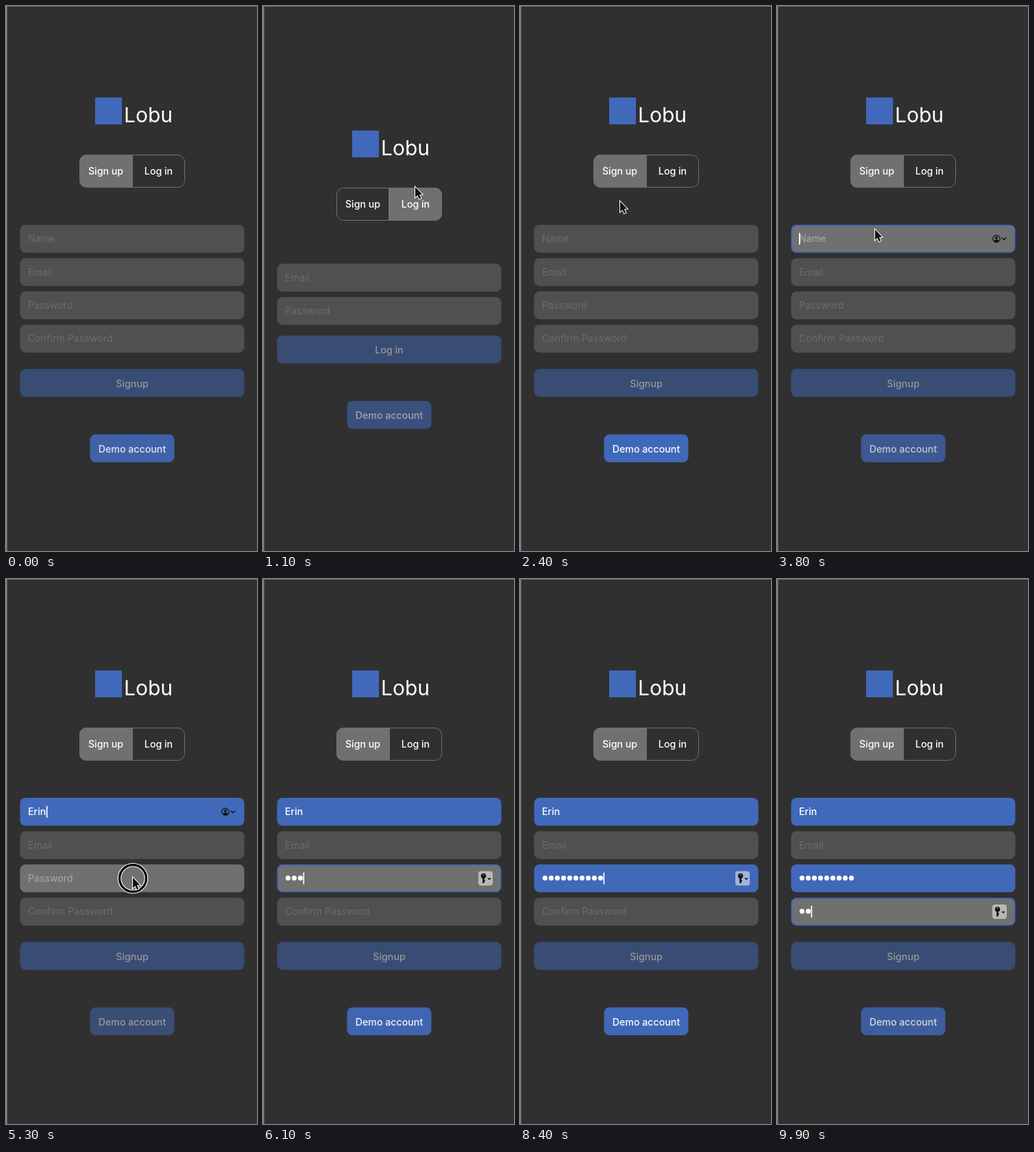
Animation of 366x792 px, one loop 10 s. Source, as an HTML page with a canvas:

```html
<!DOCTYPE html>
<html lang="en">
<head>
<meta charset="utf-8">
<title>Sign up</title>
<style>
  html, body { margin: 0; width: 100%; height: 100%; overflow: hidden; background: #313031; }
  canvas { display: block; }
</style>
</head>
<body>
<canvas width="366" height="792"></canvas>
<script>
const c = document.querySelector('canvas').getContext('2d');
const BG = '#313031', GRAY = '#717071', BLUE = '#4169b9', HINT = '#a9a9a9';
const LEFT = 20.5, WIDTH = 327, HEIGHT = 40.5;

// Pointer path: seconds, x, y
const path = [
  [0.1, 262, 330], [0.8, 222, 241], [1.4, 222, 285], [1.7, 169, 283], [1.95, 146, 284],
  [2.5, 146, 284], [3.3, 143, 325], [4.1, 143, 325], [4.9, 150, 345], [5.2, 185, 434], [10, 185, 434]
];
const clicks = [0.95, 2.05, 3.4, 5.25];

const within = (t, a, b) => t >= a && t < b;
const count = (t, start, step, max) => Math.max(0, Math.min(max, Math.floor((t - start) / step)));

function round(x, y, w, h, r, fill) {
  c.beginPath();
  c.roundRect(x, y, w, h, r);
  c.fillStyle = fill;
  c.fill();
}

function text(s, x, y, fill = '#fff', align = 'left', font = '500 14.2px') {
  c.font = font + ' Inter, sans-serif';
  c.textAlign = align;
  c.fillStyle = fill;
  c.fillText(s, x, y);
}

function stroke(points, color, width) {
  c.beginPath();
  points.forEach(([x, y]) => c.lineTo(x, y));
  c.strokeStyle = color;
  c.lineWidth = width;
  c.stroke();
}

function circle(x, y, r, fill) {
  c.beginPath();
  c.arc(x, y, r, 0, 7);
  if (fill) {
    c.fillStyle = fill;
    c.fill();
  }
}

// Fades a finished control into the background
function fade(x, y, w, h, opacity) {
  c.globalAlpha = 1 - opacity;
  round(x - 0.5, y - 0.5, w + 1, h + 1, 8, BG);
  c.globalAlpha = 1;
}

function button(label, x, y, w, opacity) {
  round(x, y, w, HEIGHT, 8, BLUE);
  text(label, x + w / 2, y + 26, '#fff', 'center');
  fade(x, y, w, HEIGHT, opacity);
}

function chevron(x, y, s) {
  stroke([[x - s, y - s / 2], [x, y + s / 2], [x + s, y - s / 2]], '#111', 1.4);
}

function personIcon(y) {
  circle(320, y, 5.2);
  c.strokeStyle = '#111';
  c.lineWidth = 1.2;
  c.stroke();
  circle(320, y - 1.3, 1.9, '#111');
  c.beginPath();
  c.ellipse(320, y + 3.2, 3.5, 2, 0, 0, 7);
  c.fill();
  chevron(331, y, 3);
}

function keyIcon(y) {
  round(314, y - 10.5, 21, 21, 4, 'rgba(255,255,255,.5)');
  circle(321.5, y - 3.5, 3.7, '#111');
  c.fillRect(320.2, y, 2.6, 7);
  c.fillRect(322, y + 2.5, 2, 1.5);
  circle(321.5, y - 5, 0.9, '#aaa');
  chevron(330, y + 0.5, 2);
}

function field({ hint, value = '', dots = 0, valid, focus, icon }, y, pointer) {
  const mid = y + HEIGHT / 2;
  const hover = pointer && within(pointer[0], LEFT, LEFT + WIDTH) && within(pointer[1], y, y + HEIGHT);
  round(LEFT, y, WIDTH, HEIGHT, 8, focus || valid ? BLUE : GRAY);
  if (focus && !valid) round(LEFT + 1.7, y + 1.7, WIDTH - 3.4, HEIGHT - 3.4, 6.5, GRAY);
  if (value) text(value, 32, mid + 5);
  else if (!dots) text(hint, 32, mid + 5, HINT, 'left', '400 14.2px');
  for (let i = 0; i < dots; i++) circle(36.5 + 9 * i, mid - 0.5, 3.6, '#fff');
  if (focus) {
    const end = dots ? 31 + 9 * dots + 0.5 : value ? 32.5 + c.measureText(value).width : 32;
    c.fillStyle = '#fff';
    c.fillRect(end, mid - 8.5, 1.7, 17);
    icon(mid);
  }
  if (!focus && !valid && !hover) fade(LEFT, y, WIDTH, HEIGHT, 0.5);
}

function header(y, login) {
  round(130, y, 39, 39, 0, BLUE);
  text('Lobu', 172, y + 36, '#fff', 'left', '400 30px');
  const top = y + 83;
  round(login ? 183 : 107, top, 78, 48, login ? [0, 10, 10, 0] : [10, 0, 0, 10], GRAY);
  c.beginPath();
  c.roundRect(107.5, top + 0.5, 153, 47, 10);
  c.strokeStyle = GRAY;
  c.lineWidth = 1;
  c.stroke();
  text('Sign up', 145.5, top + 29, '#fff', 'center');
  text('Log in', 222.5, top + 29, '#fff', 'center');
}

function pointerAt(t) {
  if (!within(t, 0.1, 4.1) && !within(t, 4.9, 5.8)) return null;
  const i = path.findIndex(p => p[0] > t);
  const [t0, x0, y0] = path[i - 1], [t1, x1, y1] = path[i];
  const u = (t - t0) / (t1 - t0), k = u * u * (3 - 2 * u);
  return [x0 + (x1 - x0) * k, y0 + (y1 - y0) * k];
}

function drawPointer([x, y], pressed) {
  if (pressed) {
    circle(x, y + 1, 19.5);
    c.strokeStyle = '#fff';
    c.lineWidth = 5.5;
    c.stroke();
    c.strokeStyle = '#000';
    c.lineWidth = 3.3;
    c.stroke();
  }
  c.beginPath();
  [[0, 0], [0, 15], [3.4, 12], [5.9, 17.4], [8.3, 16.3], [6, 11], [10.3, 10.6]]
    .forEach(([dx, dy]) => c.lineTo(x + dx, y + dy));
  c.closePath();
  c.strokeStyle = '#fff';
  c.lineWidth = 2;
  c.stroke();
  c.fillStyle = '#111';
  c.fill();
}

function draw(t) {
  const login = within(t, 1.05, 2.15);
  const pointer = pointerAt(t);
  const name = 'Erin'.slice(0, count(t, 4.05, 0.17, 4));
  const secret = t < 8.7 ? count(t, 5.4, 0.22, 10) : 9;
  const repeat = count(t, 9.25, 0.25, 2);
  const email = { hint: 'Email' };
  const password = {
    hint: 'Password', dots: login ? 0 : secret, valid: secret >= 8,
    focus: within(t, 5.4, 9.15), icon: keyIcon
  };
  const fields = login ? [email, password] : [
    { hint: 'Name', value: name, valid: name.length > 2, focus: within(t, 3.45, 5.4), icon: personIcon },
    email, password,
    { hint: 'Confirm Password', dots: repeat, focus: t >= 9.15, icon: keyIcon }
  ];

  c.fillStyle = BG;
  c.fillRect(0, 0, 366, 792);
  c.fillStyle = '#7f817b';
  c.fillRect(0, 0, 1.7, 792);
  c.fillStyle = '#716f6a';
  c.fillRect(0, 0, 366, 1);

  header(login ? 181 : 133, login);
  fields.forEach((f, i) => field(f, (login ? 374.5 : 318) + 48.4 * i, pointer));
  button(login ? 'Log in' : 'Signup', LEFT, login ? 479 : 527.5, WIDTH, 0.5);
  const pulse = 0.75 + 0.25 * Math.cos(Math.PI * (t - 0.33));
  button('Demo account', 122.5, login ? 574 : 622.5, 123, pulse);
  if (pointer) drawPointer(pointer, clicks.some(s => within(t, s, s + 0.15)));
}

function frame() {
  draw(performance.now() / 1000 % 10);
  requestAnimationFrame(frame);
}
frame();
</script>
</body>
</html>
```
